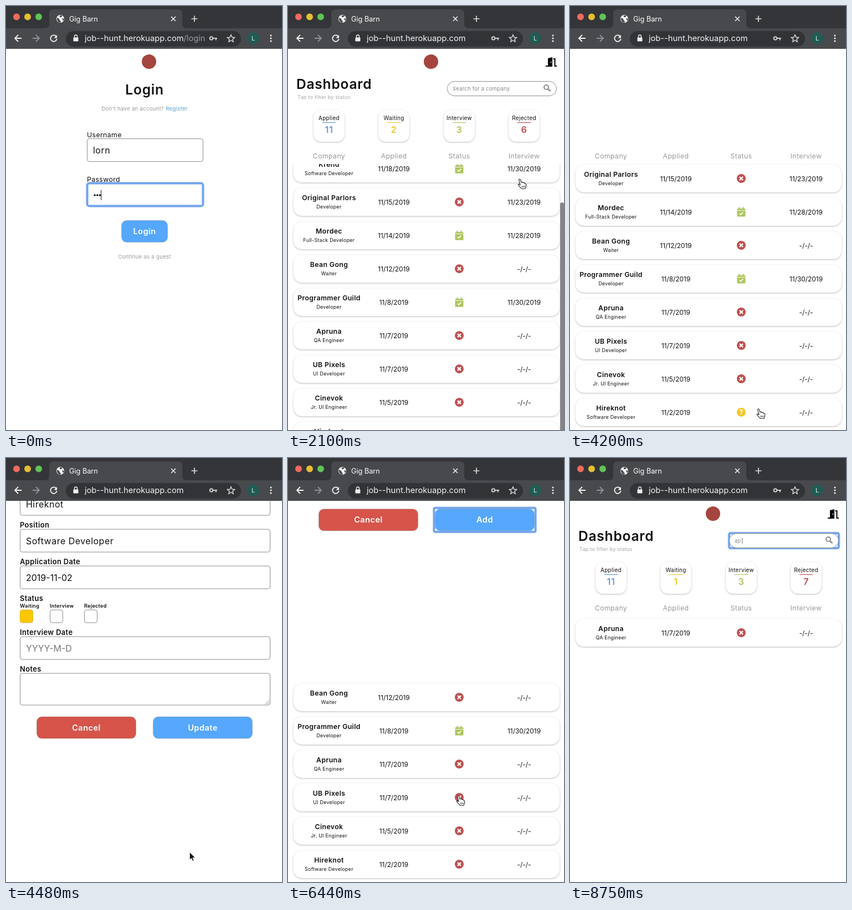
Animation of 498 by 762 pixels, one loop 8.89 s. Source, as an HTML page:

```html
<!DOCTYPE html>
<html lang="en">
<head>
<meta charset="utf-8">
<title>Gig Barn</title>
<style>
html, body { margin: 0; width: 100%; height: 100%; overflow: hidden; background: #fff; }
svg { display: block; width: 498px; height: 762px; }
text { font-family: Inter, "Open Sans", sans-serif; letter-spacing: .03em; white-space: pre; }
.plain text, .date { letter-spacing: 0; }
.card { fill: #fff; filter: drop-shadow(0 1.5px 1.5px rgba(0, 0, 0, .27)); }
.field { fill: #fff; stroke: #8c8c8c; }
.button { stroke: rgba(128, 128, 128, .4); }
.ring { fill: none; stroke: #5e97e8; stroke-width: 2; }
.halo { fill: none; stroke: #a9c8f5; stroke-width: 5; }
</style>
</head>
<body>
<svg id="stage" viewBox="0 0 498 762"></svg>
<script>
const LOOP = 8890, STEP = 70, MAX_SCROLL = 124, FORM_HEIGHT = 813;
const BLUE = '#55a8fd', RED = '#d6544a', GREEN = '#adc55c', YELLOW = '#f2c92c', BRICK = '#bd5150';
const COLUMNS = [74, 191, 309, 426];
const TIME = { dashboard: 700, open: 4085, reject: 5320, update: 5880, close: 6197, slide: 700, focus: 8120 };

const apps = [
  ['TutorBramble', 'TA', '11/24/2019', 'rejected', '11/15/2019'],
  ['Krend', 'Software Developer', '11/18/2019', 'interview', '11/30/2019'],
  ['Original Parlors', 'Developer', '11/15/2019', 'rejected', '11/23/2019'],
  ['Mordec', 'Full-Stack Developer', '11/14/2019', 'interview', '11/28/2019'],
  ['Bean Gong', 'Waiter', '11/12/2019', 'rejected', '-/-/-'],
  ['Programmer Guild', 'Developer', '11/8/2019', 'interview', '11/30/2019'],
  ['Apruna', 'QA Engineer', '11/7/2019', 'rejected', '-/-/-'],
  ['UB Pixels', 'UI Developer', '11/7/2019', 'rejected', '-/-/-'],
  ['Cinevok', 'Jr. UI Engineer', '11/5/2019', 'rejected', '-/-/-'],
  ['Hireknot', 'Software Developer', '11/2/2019', 'waiting', '-/-/-'],
];

// Markup helpers
const text = (x, y, size, str, o = {}) =>
  `<text x="${x}" y="${y}" font-size="${size}" font-weight="${o.weight || 400}" fill="${o.fill || '#111'}"` +
  ` text-anchor="${o.mid ? 'middle' : 'start'}" ${o.attr || ''}>${str}</text>`;
const rect = (x, y, w, h, r, attr) => `<rect x="${x}" y="${y}" width="${w}" height="${h}" rx="${r}" ${attr}/>`;
const dot = (x, y, r, fill) => `<circle cx="${x}" cy="${y}" r="${r}" fill="${fill}"/>`;
const line = (d, color, width = 2, attr = '') =>
  `<path d="${d}" fill="none" stroke="${color}" stroke-width="${width}" ${attr}/>`;
const group = (id, body, attr = '') => `<g id="${id}" ${attr}>${body}</g>`;
const field = (x, y, w, h) => rect(x + .5, y + .5, w, h, 4, 'class="field"');
const focusRing = (x, y, w, h, r) =>
  rect(x, y, w, h, r, 'class="halo"') + rect(x, y, w, h, r, 'class="ring"');
const button = (x, y, w, h, color, label, id = '') =>
  rect(x + .5, y + .5, w - 1, h - 1, h > 30 ? 9 : 4, `class="button" fill="${color}"`) +
  text(x + w / 2, y + h / 2 + 5, 14.6, label, { weight: 600, fill: '#fff', mid: 1, attr: id && `id="${id}"` });

const icons = {
  rejected: dot(0, 0, 8, BRICK) + line('M-3 -3L3 3M3 -3L-3 3', '#fff', 2.4),
  waiting: dot(0, 0, 8, YELLOW) + text(0, 4.3, 12, '?', { weight: 700, fill: '#fff', mid: 1 }),
  interview: rect(-7.5, -6, 15, 14.5, 1.5, `fill="${GREEN}"`) +
    line('M-3.5 -8.5v4M3.5 -8.5v4', GREEN, 2.2) + line('M-7.5 -2.6h15', '#fff', 1) +
    line('M-3.2 2.6l2.3 2.3 4.2 -4.4', '#fff', 1.8),
};

function browser() {
  const lights = ['#ee6a5f', '#e5bf30', '#5fc454'].map((c, i) => dot(19 + 20 * i, 19.5, 6, c)).join('');
  return rect(0, 0, 498, 77, 0, 'fill="#343539"') + rect(0, 40, 498, 37, 0, 'fill="#47494d"') + lights +
    '<path d="M70 40q8 0 8 -8V14q0 -8 8 -8H310q8 0 8 8v18q0 8 8 8z" fill="#47494d"/>' +
    dot(98, 23, 7, '#f4f4f4') +
    '<path d="M92 21l4 2 1 3 2 1 -1 3q-5 -1 -6 -6zM97 17l5 0 -2 3 -3 0zM101 22l4 1 -2 4z" fill="#47494d"/>' +
    text(114, 27.5, 12.7, 'Gig Barn', { fill: '#fff' }) +
    line('M298 19l8 8M306 19l-8 8', '#eee', 1.6) + line('M340 17.5v11M334.5 23h11', '#ddd', 1.7) +
    line('M28 58H16M22 52l-6 6 6 6', '#f4f4f4', 1.8) + line('M48 58h12M54 52l6 6 -6 6', '#8f9195', 1.8) +
    line('M90.5 54.5A5.7 5.7 0 1 0 91.7 59', '#f4f4f4', 1.8) + '<path d="M92 52v5.4h-5.4z" fill="#f4f4f4"/>' +
    rect(108, 45, 316, 28, 14, 'fill="#313337"') +
    rect(121.5, 56.5, 9, 7, 1, 'fill="#eee"') + line('M123.5 57v-2.5a2.5 2.5 0 0 1 5 0v2.5', '#eee', 1.4) +
    text(142, 63, 14.7, 'job--hunt.herokuapp.com<tspan id="path" fill="#9a9ca0">/login</tspan>', { fill: '#f4f4f4' }) +
    '<circle cx="370.5" cy="58" r="2.8" fill="none" stroke="#ccc" stroke-width="2"/>' +
    line('M373.5 58H381M378.8 58v3.6', '#ccc', 2) +
    line('M406 51.8l1.9 4.3 4.7 .4 -3.6 3.1 1.1 4.6 -4.1 -2.5 -4.1 2.5 1.1 -4.6 -3.6 -3.1 4.7 -.4z', '#ddd', 1.4) +
    dot(446, 58, 10.5, '#1f5c54') + text(446, 62, 11, 'L', { fill: '#eee', mid: 1 }) +
    [53, 58, 63].map(y => dot(478, y, 1.6, '#eee')).join('');
}

const logo = dot(258, 100, 13, '#a5453f');

function login() {
  return logo + text(250, 159, 24.6, 'Login', { weight: 600, mid: 1 }) +
    text(250, 188, 9.6, 'Don\'t have an account? <tspan fill="#569fca">Register</tspan>', { fill: '#999', mid: 1 }) +
    text(146, 236, 12.3, 'Username') + field(146, 238, 209, 41) + text(157, 265, 16, 'lorn') +
    text(146, 316, 12.3, 'Password') + field(146, 318, 209, 41) + focusRing(146.5, 318.5, 209, 41, 4) +
    line('', '#111', 3.6, 'id="dots" stroke-linecap="round" stroke-dasharray="0 4.6"') +
    line('', '#111', 1, 'id="caret"') +
    button(208, 385, 84, 40, BLUE, 'Login') +
    text(250, 454, 9.6, 'Continue as a guest', { fill: '#999', mid: 1 });
}

function statusCard([label, id, color], i) {
  const x = COLUMNS[i];
  return rect(x - 28, 187, 56, 57, 14, 'class="card"') + text(x, 205, 10, label, { mid: 1 }) +
    line(`M${x - 12} 209.5h24`, color, 1.2) +
    text(x, 228, 16.5, '', { weight: 600, fill: color, mid: 1, attr: `id="${id}"` });
}

function row([name, role, applied, status, interview], i) {
  const date = (x, s) => text(x, 319, 11.9, s, { mid: 1, attr: 'class="date"' });
  return group('row' + i, rect(10, 289, 480, 50, 15, 'class="card"') +
    text(74, 311, 12.3, name, { weight: 600, mid: 1 }) + text(74, 326, 8.9, role, { mid: 1 }) +
    date(191, applied) + date(426, interview) +
    `<g class="icon" transform="translate(309 314)">${icons[status]}</g>`);
}

function dashboard() {
  const cards = [['Applied', 'nApplied', '#669cd6'], ['Waiting', 'nWaiting', YELLOW],
    ['Interview', 'nInterview', GREEN], ['Rejected', 'nRejected', BRICK]];
  const heads = ['Company', 'Applied', 'Status', 'Interview'];
  const pill = rect(287.5, 135.5, 197, 26, 13, 'class="field"');
  return logo +
    '<path d="M469 94l8 -2v17h-12v-2h4zM478.5 94h4v13h2.5v2h-4.5v-13h-2z" fill="#000"/>' + dot(474.5, 101, 1, '#fff') +
    text(15, 149, 24.6, 'Dashboard', { weight: 600 }) +
    text(17, 167, 9, 'Tap to filter by status', { fill: '#a5a5a5' }) +
    group('searchFocus', focusRing(287, 135, 198, 27, 3)) + pill +
    text(297, 152, 9.4, '', { fill: '#888', attr: 'id="query"' }) + line('', '#777', 1, 'id="queryCaret"') +
    '<circle cx="466" cy="146" r="4" fill="none" stroke="#8c8c8c" stroke-width="2"/>' +
    line('M469 149l4.5 4', '#8c8c8c', 2.4) +
    cards.map(statusCard).join('') +
    heads.map((h, i) => text(COLUMNS[i], 274, 12.3, h, { fill: '#999', mid: 1 })).join('') +
    `<g clip-path="url(#listClip)">${group('list', apps.map(row).join(''))}` +
    rect(491, 285, 7, 502, 3.5, 'id="thumb" fill="#858585"') + '</g>';
}

function form() {
  const label = (y, s) => text(25, y, 12.9, s, { weight: 600 });
  const value = (y, id, attr = '') => field(25, y, 451, 41) + text(36, y + 27, 16, '', { attr: `id="${id}" ${attr}` });
  const check = (x, s, id) => text(x, 383, 9.1, s, { weight: 600 }) +
    rect(x + .5, 387.5, 23, 23, 4, `class="field" id="${id}"`);
  return rect(0, 77, 498, FORM_HEIGHT, 0, 'fill="#fff"') +
    text(15, 114, 24.6, '', { weight: 600, attr: 'id="formTitle"' }) +
    group('delete', button(394, 134, 81, 28, RED, 'Delete')) +
    label(173, 'Company') + value(176, 'company') +
    label(239, 'Position') + value(242, 'position') +
    label(305, 'Application Date') + value(308, 'applied', 'class="date"') +
    label(371, 'Status') + check(25, 'Waiting', 'isWaiting') + check(79, 'Interview', 'isInterview') +
    check(141, 'Rejected', 'isRejected') +
    label(432, 'Interview Date') + field(25, 435, 451, 41) +
    text(36, 462, 16, 'YYYY-M-D', { fill: '#777', attr: 'class="date"' }) +
    label(498, 'Notes') + field(25, 501, 451, 57) + line('M468 557l7 -7M472 557l3 -3', '#777', 1) +
    button(55, 579, 180, 40, RED, 'Cancel') +
    group('submitRing', focusRing(263.5, 577.5, 183, 43, 2)) + button(265, 579, 180, 40, BLUE, '', 'submit');
}

const hand = '<path d="M-1.5 1q1.5 -2 3 0l1.5 5q3 -1.5 3.5 .8 3 -.6 3.3 1.5 2 0 2 2l-.5 3.5 -1.3 3.5h-6.5l-5.5 -6q-1.5 -2.3 .5 -2.3l2.5 1.5z" ' +
  'fill="#fff" stroke="#222" stroke-width="1.1" stroke-linejoin="round"/>' + line('M4 12l.5 3M6.5 12v3M9 12l-.5 3', '#222', .9);
const arrow = '<path d="M0 0v14l3.3 -3 2.2 5 2.3 -1 -2.2 -4.8h4.4z" fill="#111" stroke="#fff" stroke-width=".8"/>';

const $ = id => document.getElementById(id);
$('stage').innerHTML =
  '<clipPath id="pageClip"><rect y="77" width="498" height="685"/></clipPath>' +
  '<clipPath id="listClip"><rect y="284" width="498" height="478"/></clipPath>' +
  rect(0, 0, 498, 762, 0, 'fill="#fff"') +
  group('login', login()) + group('dashboard', dashboard()) +
  `<g clip-path="url(#pageClip)">${group('form', form())}</g>` +
  group('chrome', browser(), 'class="plain"') +
  group('cursor', group('hand', hand) + group('arrow', arrow));

// Motion helpers
const clamp = u => Math.min(1, Math.max(0, u));
const smooth = u => u * u * (3 - 2 * u);
const ramp = (t, start, end) => clamp((t - start) / (end - start));

// CSS "ease": cubic-bezier(.25, .1, .25, 1)
function ease(u) {
  const bez = (a, b, s) => 3 * a * s * (1 - s) ** 2 + 3 * b * s * s * (1 - s) + s ** 3;
  let lo = 0, hi = 1;
  for (let i = 0; i < 20; i++) {
    const mid = (lo + hi) / 2;
    if (bez(.25, .25, mid) < u) lo = mid; else hi = mid;
  }
  return bez(.1, 1, lo);
}

// Time, x, y of the cursor's tip
const cursorPath = [
  [840, 300, 560], [1190, 437, 413], [1330, 437, 413], [1750, 418, 311], [3150, 418, 311],
  [3900, 340, 724], [4400, 340, 724], [5000, 162, 402], [5400, 162, 402], [5800, 345, 600],
  [6010, 345, 600], [6360, 307, 607], [7700, 307, 607], [8050, 372, 146],
];

function cursorAt(t) {
  const i = cursorPath.findIndex(k => k[0] > t);
  if (i === 0) return cursorPath[0].slice(1);
  if (i < 0) return cursorPath.at(-1).slice(1);
  const [t0, x0, y0] = cursorPath[i - 1], [t1, x1, y1] = cursorPath[i];
  const u = smooth(ramp(t, t0, t1));
  return [x0 + (x1 - x0) * u, y0 + (y1 - y0) * u];
}

const show = (id, on) => $(id).setAttribute('visibility', on ? 'inherit' : 'hidden');
const move = (id, x, y) => $(id).setAttribute('transform', `translate(${x} ${y})`);
const put = (id, str) => { $(id).textContent = str; };

function drawLogin(t) {
  const count = 3 + [140, 280, 350].filter(k => t >= k).length;
  const end = 160.2 + 4.6 * (count - 1);
  $('dots').setAttribute('d', `M160.2 340H${end + .01}`);
  $('caret').setAttribute('d', `M${end + 2.3} 331v18`);
}

function drawDashboard(t) {
  const saved = t >= TIME.close;
  put('nApplied', 11);
  put('nWaiting', saved ? 1 : 2);
  put('nInterview', 3);
  put('nRejected', saved ? 7 : 6);

  const query = 'ap'.slice(0, (t >= 8330) + (t >= 8540));
  const focused = t >= TIME.focus;
  show('searchFocus', focused);
  put('query', query || 'Search for a company');
  $('queryCaret').setAttribute('d', focused ? `M${297.5 + 6.6 * query.length} 143v11` : '');

  let slot = 0;
  apps.forEach(([name], i) => {
    const match = name.toLowerCase().includes(query);
    show('row' + i, match);
    if (match) move('row' + i, 0, 60 * slot++);
  });
  const last = $('row' + (apps.length - 1)).querySelector('.icon');
  last.innerHTML = icons[saved ? 'rejected' : 'waiting'];

  const scroll = MAX_SCROLL * (smooth(ramp(t, 1370, 2570)) - smooth(ramp(t, 7140, 7750)));
  move('list', 0, -scroll);
  move('thumb', 0, scroll * .83);
  const bar = t < 5000 ? (t > 1370) * (1 - ramp(t, 3100, 3400)) : (t >= 7140) * (1 - ramp(t, 8150, 8330));
  $('thumb').setAttribute('opacity', bar);
}

// Returns the y of the form's lower edge
function drawForm(t) {
  const editing = t < TIME.close, rejected = t >= TIME.reject;
  const shown = ease(ramp(t, TIME.open, TIME.open + TIME.slide)) - ease(ramp(t, TIME.close, TIME.close + TIME.slide));
  const top = -FORM_HEIGHT * (1 - shown);
  move('form', 0, top);
  put('formTitle', `${editing ? 'Edit' : 'Add'} an Application`);
  put('submit', editing ? 'Update' : 'Add');
  show('delete', editing);
  show('submitRing', t >= TIME.update);
  const [name, role] = apps.at(-1);
  put('company', editing ? name : '');
  put('position', editing ? role : '');
  put('applied', editing ? '2019-11-02' : '');
  $('isWaiting').style.cssText = editing && !rejected ? 'fill:#fbc800;stroke:#d9b23c' : '';
  $('isRejected').style.cssText = editing && rejected ? `fill:${RED}` : '';
  return 77 + FORM_HEIGHT + top;
}

function drawCursor(t, formBottom) {
  const [x, y] = cursorAt(t);
  const overForm = y < formBottom;
  const overButton = y > 579 && x > 265 && x < 445 && t > 5400;
  const pointing = t < 7900 && (!overForm || overButton);
  move('cursor', x, y);
  show('cursor', t >= 840 && t < 8330);
  show('hand', pointing);
  show('arrow', !pointing);
}

function draw(t) {
  const signedIn = t >= TIME.dashboard;
  show('login', !signedIn);
  show('dashboard', signedIn);
  put('path', signedIn ? '' : '/login');
  drawLogin(t);
  drawDashboard(t);
  drawCursor(t, drawForm(t));
}

let start;
function tick(now) {
  start ??= now;
  const t = (now - start) % LOOP;
  draw(Math.min(8750, Math.floor(t / STEP) * STEP));
  requestAnimationFrame(tick);
}
draw(0);
requestAnimationFrame(tick);
</script>
</body>
</html>
```
